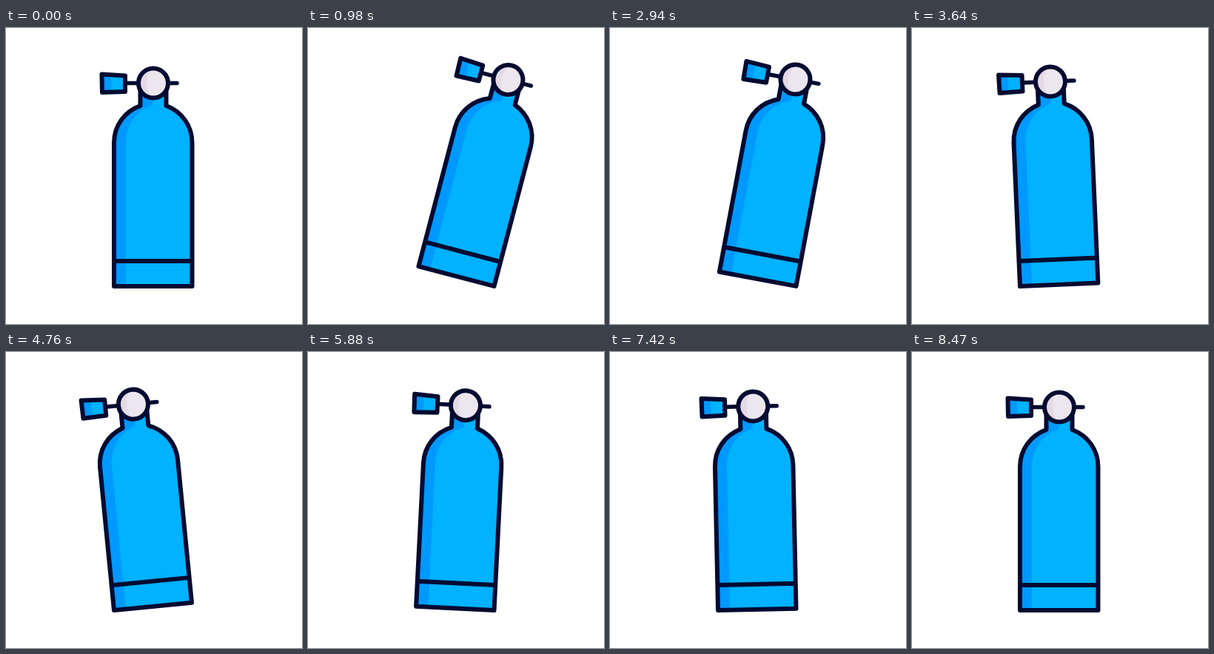
An HTML page for the animation above (8540 ms loop, 400 by 400 pixels).

```html
<!DOCTYPE html>
<html lang="en">
<head>
<meta charset="utf-8">
<title>Rocking tank</title>
<style>
html, body { margin: 0; width: 100%; height: 100%; overflow: hidden; background: #fff; }
svg { display: block; width: 100vw; height: 100vh; }
</style>
</head>
<body>
<svg viewBox="0 0 400 400">
  <g id="tank" stroke-linecap="round" stroke-linejoin="round">
    <path fill="#00b2ff" d="M146 349V155C146 132 160 113 181.500 105V85H216.500V105C237.500 113 251.500 132 251.500 155V349Z"/>
    <path fill="#0099ff" d="M146 349V155C146 132 160 113 181.500 105V85H198V104C175 112 162 132 162 155V349Z"/>
    <path fill="#00b2ff" d="M129.500 62.500L161 64.500V86L130 87Z"/>
    <path fill="#0099ff" d="M129.500 62.500L142 63.300V86.600L130 87Z"/>
    <g fill="none" stroke="#050a30" stroke-width="6">
      <path d="M146 349V155C146 132 160 113 181.500 105V85H216.500V105C237.500 113 251.500 132 251.500 155V349ZM146 315H251.500"/>
      <path d="M129.500 62.500L161 64.500V86L130 87Z"/>
      <path stroke-width="5.500" d="M161 74.500H231"/>
    </g>
    <circle cx="199" cy="74.500" r="20" fill="#ece6ee"/>
    <path fill="#e3dae5" d="M199 54.500A20 20 0 0 0 199 94.500C187 88 187 61 199 54.500Z"/>
    <circle cx="199" cy="74.500" r="20" fill="none" stroke="#050a30" stroke-width="6"/>
  </g>
</svg>
<script>
const LOOP = 8540, STEP = 70;
// Tilt in degrees over time; positive leans right.
const keys = [
  [0, 0], [455, 7.5], [910, 14], [1780, 17.8], [2170, 17.1], [2730, 13.7],
  [3640, -2.5], [4450, -6.8], [4760, -5.6], [5460, 0.9], [5880, 2.9],
  [6265, 4.2], [7280, -0.8], [7420, -1.2], [7770, -2], [8190, -1], [8470, 0], [LOOP, 0]
];
const span = i => keys[i + 1][0] - keys[i][0];
const rate = i => (keys[i + 1][1] - keys[i][1]) / span(i);

// Flat at turning points, weighted average of neighbours elsewhere.
function slope(i) {
  if (i === 0 || i === keys.length - 1) return 0;
  const a = rate(i - 1), b = rate(i), h = span(i - 1), k = span(i);
  return a * b <= 0 ? 0 : (a * k + b * h) / (h + k);
}

function tilt(t) {
  let i = 0;
  while (i < keys.length - 2 && t >= keys[i + 1][0]) i++;
  const h = span(i), u = (t - keys[i][0]) / h, v = 1 - u;
  return keys[i][1] * v * v * (1 + 2 * u) + keys[i + 1][1] * u * u * (3 - 2 * u)
    + h * u * v * (slope(i) * v - slope(i + 1) * u);
}

const tank = document.getElementById("tank");
const start = performance.now();

function draw() {
  const t = (performance.now() - start) % LOOP;
  const angle = tilt(Math.floor(t / STEP) * STEP);
  // The tank rocks on whichever bottom corner touches the ground.
  const pivot = angle > 0 ? 252 : 146;
  tank.setAttribute("transform", `rotate(${angle} ${pivot} 349)`);
  requestAnimationFrame(draw);
}
draw();
</script>
</body>
</html>
```
